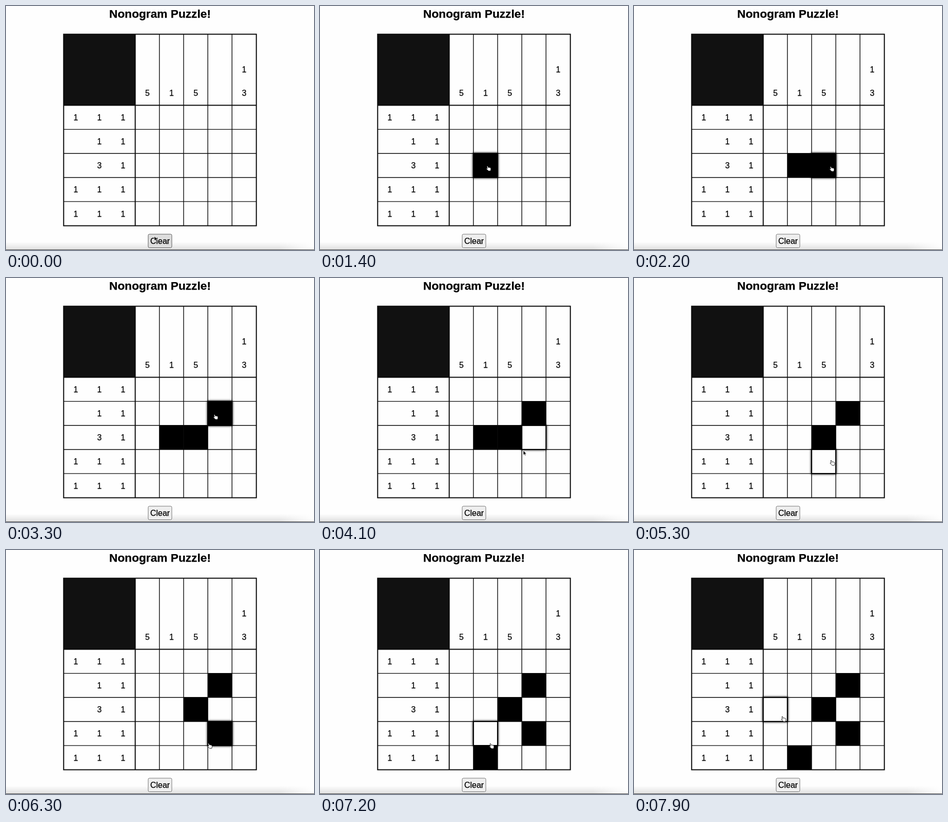
Write an HTML page that moves like this. It is 600x478 px and loops after 8000 ms.

```html
<!DOCTYPE html>
<html lang="en">
<head>
<meta charset="utf-8">
<title>Nonogram Puzzle!</title>
<style>
  html, body { margin: 0; width: 100%; height: 100%; overflow: hidden; background: #fefefe; }
  svg { display: block; width: 600px; height: 478px; }
  text { font: 16px "Liberation Sans", Arial, sans-serif; text-anchor: middle; fill: #000; stroke: #000; stroke-width: .25; }
  .title { font-size: 22.7px; font-weight: bold; }
  .line { stroke: #0a0a0a; stroke-width: 1.4; fill: none; }
  .edge { stroke: #0a0a0a; stroke-width: 2; fill: none; }
  .hover { stroke: #000; stroke-width: 2.2; filter: drop-shadow(0 0 2px #000); }
</style>
</head>
<body>
<svg viewBox="0 0 600 478">
  <defs>
    <linearGradient id="fade" x1="0" y1="0" x2="0" y2="1">
      <stop offset="0" stop-color="#fefefe"/>
      <stop offset="1" stop-color="#dedede"/>
    </linearGradient>
    <linearGradient id="clear">
      <stop offset="0" stop-color="#fefefe" stop-opacity="0"/>
      <stop offset="1" stop-color="#fefefe"/>
    </linearGradient>
  </defs>
  <rect width="600" height="478" fill="#fefefe"/>
  <rect y="462" width="600" height="16" fill="url(#fade)"/>
  <rect x="530" y="462" width="70" height="16" fill="url(#clear)"/>
  <rect y="477" width="600" height="1" fill="#4a4a4a"/>
  <text class="title" x="300" y="22.6">Nonogram Puzzle!</text>
  <rect x="112" y="55" width="140" height="140" fill="#111"/>
  <g id="clues"></g>
  <g id="cells"></g>
  <g id="lines"></g>
  <g id="focus"></g>
  <rect id="button" x="277" y="447" width="46" height="26.5" rx="2.5"/>
  <text x="300" y="465.6">Clear</text>
  <g id="pointer">
    <path id="hand" transform="scale(.88)" fill="#fff" stroke="#000" stroke-width=".9" stroke-linejoin="round"
      d="M-3.4-4.8q1.2-1.3 2.2.2l1.2 2.8q3-.8 5 .8 1 2 .4 4.2l-.6 2.6h-4.8q-2-2.6-4.2-4.2-.8-1.8 1.2-1.5l1 .6z"/>
    <path id="arrow" fill="#000" stroke="#fff" stroke-width=".7"
      d="M0 0v8.8l2-1.8 1.4 3 1.5-.7-1.4-2.9h2.8z"/>
  </g>
</svg>
<script>
const LOOP = 8000, STEP = 100, N = 5;
const SIZE = 47.15, LEFT = 251.7, TOP = 194.5;
const el = id => document.getElementById(id);
const colX = c => LEFT + c * SIZE;
const rowY = r => TOP + r * SIZE;

// Pointer moves: start, end, x, y; it rests in between
const home = [289, 451];
const moves = [
  [0, 200, 326, 388], [1100, 1200, 328, 318], [1500, 1900, 385, 319],
  [2900, 3100, 408, 272], [3600, 4100, 396, 338], [4100, 4250, 362, 354],
  [4250, 4600, 311, 325], [5000, 5300, 386, 362], [5300, 5600, 404, 381],
  [6200, 6700, 332, 406], [7000, 7200, 334, 384], [7200, 7900, 291, 331]
];
// Each click toggles the cell under the pointer
const clicks = [1400, 2100, 3300, 5000, 6000, 6800];

const ease = u => u * u * (3 - 2 * u);

function pointerAt(t) {
  let [x, y] = home;
  for (const [from, to, toX, toY] of moves) {
    const u = ease(Math.min(1, Math.max(0, (t - from) / (to - from))));
    x += (toX - x) * u;
    y += (toY - y) * u;
  }
  return [x, y];
}

// The fingertip sits up and left of the hand's middle
function cellAt([x, y]) {
  const c = Math.floor((x - 2 - LEFT) / SIZE), r = Math.floor((y - 6 - TOP) / SIZE);
  return c >= 0 && c < N && r >= 0 && r < N ? r * N + c : -1;
}

function filledAt(t) {
  const filled = new Set();
  for (const click of clicks) {
    if (click > t) break;
    const cell = cellAt(pointerAt(click));
    if (!filled.delete(cell)) filled.add(cell);
  }
  return filled;
}

const nearLine = d => Math.abs(d - Math.round(d / SIZE) * SIZE) < 3;
const onCorner = ([x, y]) => nearLine(x - LEFT) && nearLine(y - TOP);

const square = (cell, fill, cls = "") =>
  `<rect class="${cls}" x="${colX(cell % N)}" y="${rowY(Math.floor(cell / N))}"
    width="${SIZE}" height="${SIZE}" fill="${fill}"/>`;
const label = (s, x, y) => s === " " ? "" : `<text x="${x}" y="${y}">${s}</text>`;
const labels = (list, place) =>
  list.map((clue, n) => [...clue].map((s, i) => label(s, ...place(n, i))).join("")).join("");

el("clues").innerHTML =
  labels(["111", " 11", " 31", "111", "111"], (r, i) => [136 + i * 46, rowY(r) + 29.5]) +
  labels([" 5", " 1", " 5", "  ", "13"], (c, i) => [colX(c) + 23.7, 130 + i * 46]);

let lines = '<rect class="edge" x="112.3" y="55.3" width="375.4" height="375.2"/>';
for (let i = 0; i < N; i++) {
  lines += `<path class="${i ? "line" : "edge"}" d="M${colX(i)} 55V431M112 ${rowY(i)}H488"/>`;
}
el("lines").innerHTML = lines;

const show = (id, on) => el(id).setAttribute("visibility", on ? "visible" : "hidden");

function draw(t) {
  const pos = pointerAt(t), over = cellAt(pos), filled = filledAt(t);
  const inside = over >= 0;

  el("cells").innerHTML = [...filled].map(cell => square(cell, "#000")).join("");
  el("focus").innerHTML = inside
    ? square(over, filled.has(over) ? "#000" : "#fefefe", "hover") : "";

  el("button").setAttribute("fill", inside ? "#efefef" : "#dedede");
  el("button").setAttribute("stroke", inside ? "#767676" : "#5c5c5c");

  const arrow = !inside || onCorner(pos);
  show("arrow", arrow);
  show("hand", !arrow);
  el("pointer").setAttribute("transform", `translate(${pos})`);
}

const start = performance.now();
let last = -1;
function tick() {
  const t = Math.floor((performance.now() - start) % LOOP / STEP) * STEP;
  if (t !== last) draw(last = t);
  requestAnimationFrame(tick);
}
tick();
</script>
</body>
</html>
```
